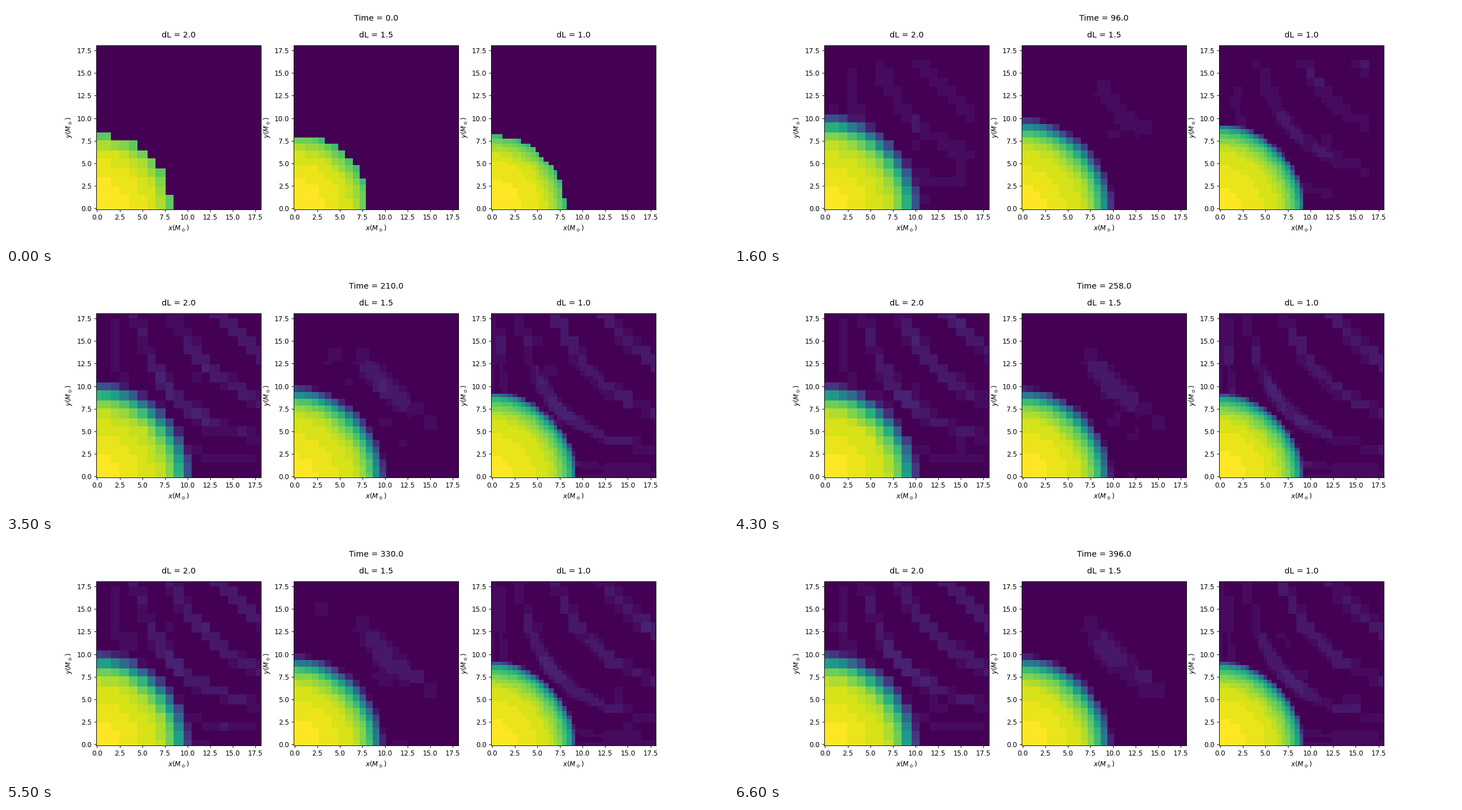
Animation of 1280 by 427 pixels, one loop 6700 ms. Source, as a matplotlib script:

```python
import numpy as np
import matplotlib.pyplot as plt
from matplotlib.animation import FuncAnimation

DPI = 256 / 3
FRAMES, INTERVAL, TIME_STEP = 67, 100, 6.0
LEVELS = 32              # colour steps of the density map
PERIOD, PEAK = 140, 82   # radial pulsation of the star
SIZE, SAMPLES = 18, 100

# Every panel resamples its own cell grid onto the same square raster.
STEP = SIZE / (SAMPLES - 1)
RASTER = np.meshgrid(*[np.linspace(0, SIZE, SAMPLES)] * 2)
EXTENT = [-STEP / 2, SIZE + STEP / 2] * 2


class Panel:
    def __init__(self, ax, seed, title, cell, coarse, cut, mean, swing, sharp,
                 crest, spacing, width, gated=False):
        self.mean, self.swing, self.sharp = mean, swing, sharp
        self.crest, self.spacing, self.width = crest, spacing, width

        size = np.where(np.maximum(*RASTER) < cut, cell, coarse)
        self.x, self.y = (np.round(axis / size) * size for axis in RASTER)
        self.r = np.hypot(self.x, self.y)
        self.q = np.sqrt(self.x * self.y)
        angle = np.arctan2(self.y, self.x)
        self.diagonal = np.sin(2 * angle) ** 2

        # Crests glow near the diagonal, or only inside one patch.
        if gated:
            self.glow = np.exp(-((angle - 0.7) / 0.45) ** 4 - ((self.r - 14) / 2.5) ** 4)
        else:
            self.glow = (0.5 + 0.5 * np.sqrt(self.diagonal)
                         + 0.5 * self.diagonal ** 2 * np.exp(-((self.r - 11.5) / 2) ** 2))

        rng = np.random.default_rng(seed)
        self.waves = rng.uniform([-1.6, -1.6, -0.04, 0], [1.6, 1.6, 0.04, 6.28], (8, 4))

        self.image = ax.imshow(self.density(0), cmap="viridis", vmin=0, vmax=1,
                               origin="lower", interpolation="nearest", extent=EXTENT)
        ticks = np.arange(0, SIZE, 2.5)
        ax.set(xticks=ticks, yticks=ticks,
               xlabel=r"$x (M_\odot)$", ylabel=r"$y (M_\odot)$")
        ax.set_title(title, pad=12)

    def star(self, t):
        pulse = np.cos(2 * np.pi * (t - PEAK) / PERIOD)
        core = 1 - 0.0019 * self.r ** 2 - 0.006 * pulse
        height = self.r + 0.2 * self.diagonal * (t > 0) - self.mean - self.swing * pulse
        inside = 0.5 + 0.2 * np.log(1 + 2.9 * np.maximum(-height, 0))
        outside = 0.5 - 0.37 * self.sharp * height
        shell = np.where(height < 0, inside, outside)
        spread = 8.13 + 0.06 * t    # the initial hard edge dissolves outwards
        return np.where(self.r < spread, np.minimum(core, shell), 0)

    def atmosphere(self, t):
        noise = sum(np.cos(kx * self.x + ky * self.y + w * t + p)
                    for kx, ky, w, p in self.waves) / 2
        speckle = 0.035 * ((noise > 1.9) & (self.r < 16))

        # Wave crests follow x * y = const and settle onto fixed spacings.
        settled = self.crest + np.exp(-(t - 96) / 40)
        offset = (self.q - settled + self.spacing / 2) % self.spacing - self.spacing / 2
        crests = (0.065 * self.glow * (0.95 + 0.15 * noise)
                  * np.exp(-(offset / self.width) ** 4))

        reached = np.maximum(self.x, self.y) < 8.5 + 0.08 * t
        return np.maximum(speckle, crests) * reached * min(t / 140, 1)

    def density(self, t):
        value = np.maximum(self.star(t), self.atmosphere(t))
        return np.round(value * LEVELS) / LEVELS


fig, axes = plt.subplots(1, 3, figsize=(1280 / DPI, 427 / DPI), dpi=DPI)
panels = [
    Panel(axes[0], 4, "dL = 2.0", cell=1, coarse=1, cut=SIZE, mean=9.12, swing=0.28,
          sharp=1, crest=5.3, spacing=3.45, width=0.58),
    Panel(axes[1], 5, "dL = 1.5", cell=0.75, coarse=1.5, cut=12.75, mean=8.83, swing=0.22,
          sharp=1.2, crest=10, spacing=10, width=0.95, gated=True),
    Panel(axes[2], 6, "dL = 1.0", cell=0.5, coarse=1, cut=12.5, mean=8.72, swing=0.22,
          sharp=2.2, crest=3.6, spacing=3.8, width=0.55),
]
clock = fig.suptitle("Time = 0.0", x=0.5125, y=0.965)


def update(frame):
    t = frame * TIME_STEP
    clock.set_text(f"Time = {t:.1f}")
    for panel in panels:
        panel.image.set_data(panel.density(t))
    return [clock, *(panel.image for panel in panels)]


animation = FuncAnimation(fig, update, frames=FRAMES, interval=INTERVAL,
                          repeat=True, repeat_delay=0)
plt.show()
```
